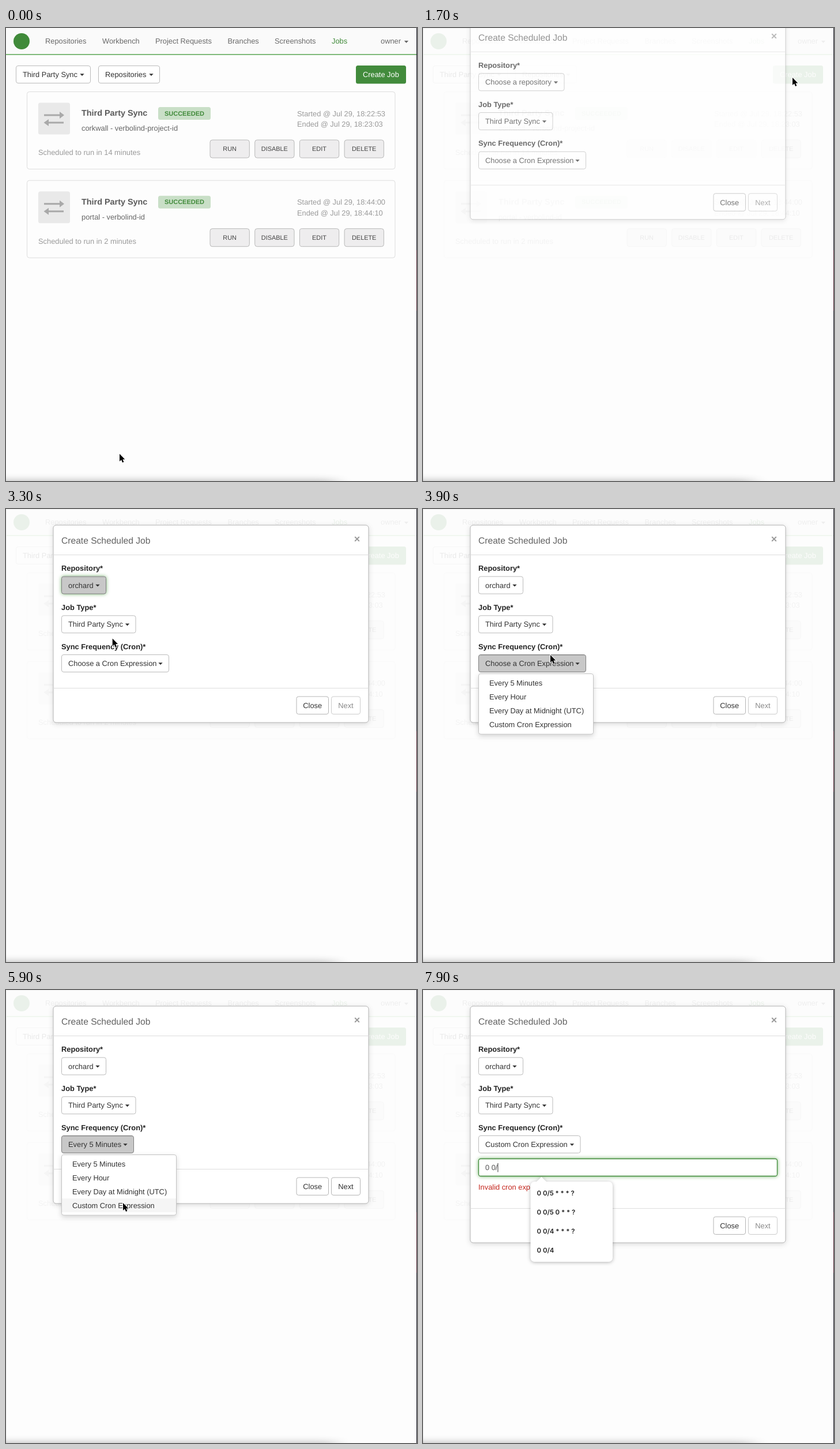
Write an HTML page that moves like this. It is 713 px wide and 785 px high and loops after 8 s.

```html
<!DOCTYPE html>
<html lang="en">
<head>
<meta charset="utf-8">
<title>Create Scheduled Job</title>
<style>
  html, body { margin: 0; width: 100%; height: 100%; overflow: hidden; background: #fdfdfd; }
  svg { display: block; width: 100%; height: 100%; }
  text { font: 12.85px "Liberation Sans", Arial, sans-serif; white-space: pre; text-rendering: geometricPrecision; }
  .bold { font-weight: 700; }
  .mid { text-anchor: middle; }
  .hint { font: 600 11.4px Inter, "Open Sans", sans-serif; }
  .menu { filter: drop-shadow(0 3px 4px rgba(0, 0, 0, .16)); }
  .popup { filter: drop-shadow(0 1px 3px rgba(0, 0, 0, .3)); }
  .dialog { filter: drop-shadow(0 2px 4px rgba(0, 0, 0, .14)); }
  .glow { filter: drop-shadow(0 0 3px rgba(80, 160, 70, .75)); }
</style>
</head>
<body>
<svg viewBox="0 0 713 785">
  <defs>
    <filter id="soft" x="-20%" y="-200%" width="140%" height="500%">
      <feGaussianBlur stdDeviation="16 7"/>
    </filter>
  </defs>
  <g id="scene"></g>
  <rect x="-80" y="785" width="652" height="50" opacity=".3" filter="url(#soft)"/>
  <path d="M712.5 0V785" stroke="#20202c"/>
  <path d="M712.5 385V490" stroke="#4a2030"/>
</svg>
<script>
const LOOP = 8000, STEP = 100;
const GREEN = '#408a3a';
const scene = document.getElementById('scene');

const PRESS_CREATE = 800, BACKDROP = 1450, DIALOG = 1600;
const OPEN_REPO = 2300, PICK_REPO = 3000;
const OPEN_CRON = 3700, PICK_PRESET = 4700, REOPEN_CRON = 5400, PICK_CUSTOM = 6200;
const FOCUS_INPUT = 6400, SHOW_HINTS = 6500, TYPE_START = 6900, TYPE_GAP = 300;

const REPOS = ['corkwall', 'portal', 'orchard'];
const SCHEDULES = ['Every 5 Minutes', 'Every Hour', 'Every Day at Midnight (UTC)', 'Custom Cron Expression'];
const HISTORY = ['0 0 0 * * ?', '0 0/5 * * * ?', '0 0 * * * ?', '0 0/5 0 * * ?',
  'adsasdf', 'asdf', '0 0/4 * * * ?', '0 0/4'];

// Pointer stops: time, x, y
const POINTER = [
  [0, 197, 738], [600, 641, 86], [1700, 641, 86], [2200, 232, 126], [2600, 232, 126],
  [2900, 165, 209], [3100, 165, 209], [3600, 221, 253], [4000, 221, 253], [4400, 202, 298],
  [4800, 202, 298], [5100, 202, 270], [5400, 202, 270], [5800, 203, 369], [6200, 203, 369],
  [6500, 203, 314]
];

const clamp = v => Math.max(0, Math.min(1, v));
const ease = v => v * v * (3 - 2 * v);
const between = (t, from, to) => t >= from && t < to;

function pointerAt(t) {
  const next = POINTER.findIndex(p => p[0] > t);
  if (next < 0) return POINTER[POINTER.length - 1].slice(1);
  const [t0, x0, y0] = POINTER[next - 1], [t1, x1, y1] = POINTER[next];
  const k = ease((t - t0) / (t1 - t0));
  return [x0 + (x1 - x0) * k, y0 + (y1 - y0) * k];
}

const text = (x, y, str, fill = '#333', cls = '', size = 0) =>
  `<text x="${x}" y="${y}" fill="${fill}" class="${cls}"${size ? ` style="font-size:${size}px"` : ''}>${str}</text>`;
const box = (x, y, w, h, fill, stroke = 'none', r = 3.5, extra = '') =>
  `<rect x="${x}" y="${y}" width="${w}" height="${h}" rx="${r}" fill="${fill}" stroke="${stroke}" ${extra}/>`;
const line = (x1, x2, y, color) => `<path d="M${x1} ${y}H${x2}" stroke="${color}"/>`;
const arrowDown = (x, y, fill = '#333') => `<path d="M${x - 3.7} ${y}h7.4l-3.7 3.9z" fill="${fill}"/>`;

function dropdown(x, y, w, label, fill = '#fff', glow = false) {
  const active = fill === '#c8c8c8';
  return box(x + .5, y + .5, w - 1, 30, fill, active ? '#808080' : '#bbb', 3.5, glow ? 'class="glow"' : '') +
    (active ? `<path d="M${x + 3} ${y + 1.5}H${x + w - 3}" stroke="#b0b0b0"/>` : '') +
    text(x + 12, y + 20, label) + arrowDown(x + w - 15, y + 14.2);
}

function menu(y, w, items, pointerY) {
  const rows = items.map((label, i) => {
    const top = y + 5 + i * 23.8;
    const hover = between(pointerY, top, top + 23.8);
    return (hover ? box(97, top, w - 2, 23.8, '#f5f5f5', 'none', 0) : '') + text(115, top + 16.3, label);
  });
  return box(96.5, y + .5, w - 1, items.length * 23.8 + 9.5, '#fff', '#c4c4c4', 3.5, 'class="menu"') + rows.join('');
}

function card(y, project, wait, started, ended) {
  const actions = ['RUN', 'DISABLE', 'EDIT', 'DELETE'].map((label, i) => {
    const x = 354 + i * 77.7;
    return box(x, 84, 68.3, 31, '#eeedee', '#b8b8b8', 4) + text(x + 34.1, 103.3, label, '#444', 'mid', 10.9);
  });
  return `<g transform="translate(0 ${y})">` +
    box(36.5, .5, 638.5, 134, '#fdfdfd', '#ddd', 4) +
    box(56, 19.5, 55, 55, '#e9e9e9') +
    '<path d="M66 39.5H93V35L101 41L93 47V42.5H66zM100 52.5H74V48L65.500 54L74 60V55.500H100z" fill="#a9a9a9"/>' +
    text(131, 42, 'Third Party Sync', '#5a5a5a', 'bold', 14.4) +
    box(264, 27, 91, 22, '#c9dfc7') + text(309.5, 41.8, 'SUCCEEDED', GREEN, 'bold mid', 11) +
    text(131, 68, project, '#666') +
    text(56, 110.3, `Scheduled to run in ${wait}`, '#9a9a9a') +
    text(505, 42.5, `Started @ Jul 29, ${started}`, '#9a9a9a') +
    text(505, 61, `Ended @ Jul 29, ${ended}`, '#9a9a9a') +
    actions.join('') + '</g>';
}

function createButton(t) {
  const pressed = between(t, PRESS_CREATE, DIALOG), hover = between(t, 600, PRESS_CREATE);
  const shape = pressed
    ? box(608, 66, 85, 30, '#29501f', '#1d55a8', 3.5, 'stroke-width="2" class="glow"')
    : box(607, 65, 87, 31.5, hover ? '#316b2c' : '#428b3c');
  return shape + text(619, 85, 'Create Job', '#fff');
}

function page(t) {
  const tabs = [[68, 'Repositories'], [167, 'Workbench'], [259, 'Project Requests'],
    [384.5, 'Branches'], [466, 'Screenshots'], [565, 'Jobs'], [650, 'owner']];
  return box(0, 0, 713, 785, '#fdfdfd', 'none', 0) +
    box(0, 0, 713, 45.5, '#fafafa', 'none', 0) +
    box(0, 45.2, 712, 1.5, '#58a552', 'none', 0) +
    `<circle cx="27" cy="23" r="14" fill="${GREEN}"/>` +
    tabs.map(([x, label]) => text(x, 27.3, label, label === 'Jobs' ? GREEN : '#696969')).join('') +
    arrowDown(694.5, 22, '#696969') +
    dropdown(17, 65, 130, 'Third Party Sync') + dropdown(160, 65, 107, 'Repositories') +
    createButton(t) +
    card(110, 'corkwall - verbolind-project-id', '14 minutes', '18:22:53', '18:23:03') +
    card(263.7, 'portal - verbolind-id', t < PICK_PRESET ? '2 minutes' : '1 minute', '18:44:00', '18:44:10');
}

function cronInput(typed) {
  const caretX = 108.5 + [...typed].reduce((w, c) => w + (c === '0' ? 7.15 : 3.57), 0);
  return box(96.5, 292.5, 518, 30, '#fff', GREEN, 3.5, 'stroke-width="1.3" class="glow"') +
    text(108, 312, typed || 'Enter Custom Cron Expression (e.g. 0 0/5 * * * ?)', typed ? '#555' : '#8c8c8c') +
    `<path d="M${caretX} 300V315.500" stroke="#333"/>`;
}

function hints(typed) {
  const items = HISTORY.filter(h => h.startsWith(typed)).slice(0, 6);
  return '<g class="popup"><path d="M196 333L205.500 324L215 333z" fill="#fff"/>' +
    box(186.5, 332, 142.5, items.length * 33 + 7, '#fff', 'none', 7) + '</g>' +
    items.map((h, i) => text(197.5, 356.3 + i * 33, h, '#222', 'hint')).join('');
}

function footer(y, enabled) {
  return line(82, 629, y, '#ddd') +
    box(504, y + 14.5, 55.5, 30.5, '#fff', '#b5b5b5') + text(531.7, y + 34.5, 'Close', '#333', 'mid') +
    box(564.5, y + 14.5, 50, 30.5, '#fff', enabled ? '#b5b5b5' : '#ccc') +
    text(589.5, y + 34.5, 'Next', enabled ? '#333' : '#8a8a8a', 'mid');
}

function dialog(t, pointerY) {
  const custom = t >= PICK_CUSTOM;
  const typed = t < TYPE_START ? '' : '0 0/'.slice(0, 1 + Math.floor((t - TYPE_START) / TYPE_GAP));
  const footerY = typed ? 378.5 : custom ? 350.5 : 310.5;
  const repoOpen = between(t, OPEN_REPO, PICK_REPO);
  const cronOpen = between(t, OPEN_CRON, PICK_PRESET) || between(t, REOPEN_CRON, PICK_CUSTOM);
  const repoFill = between(t, OPEN_REPO, 3600) ? '#c8c8c8' : between(t, 2200, OPEN_REPO) ? '#e2e2e2' : '#fff';
  const cronFill = between(t, OPEN_CRON, FOCUS_INPUT) ? '#c8c8c8' : between(t, 3600, OPEN_CRON) ? '#e2e2e2' : '#fff';
  const [cron, cronWidth] = custom ? [SCHEDULES[3], 177.5]
    : t >= PICK_PRESET ? [SCHEDULES[0], 126] : ['Choose a Cron Expression', 187];
  const [repo, repoWidth] = t >= PICK_REPO ? [REPOS[2], 78] : ['Choose a repository', 149.5];

  const shown = clamp((t - DIALOG) / 150);
  const slide = -86 * (1 - clamp((t - DIALOG) / 300)) ** 2;
  return `<g opacity="${shown}" transform="translate(0 ${slide})">` +
    box(82, 28, 547, footerY + 31.5, '#fff', '#b4b4b4', 5, 'class="dialog"') +
    text(96, 60, 'Create Scheduled Job', '#626262', '', 15.6) +
    text(609, 58, '×', '#999', 'bold mid', 18) +
    line(82, 629, 79.5, '#ddd') +
    text(96, 107.3, 'Repository*', '#222', 'bold') +
    text(96, 175, 'Job Type*', '#222', 'bold') +
    text(96, 242.5, 'Sync Frequency (Cron)*', '#222', 'bold') +
    dropdown(96, 116.5, repoWidth, repo, repoFill, between(t, PICK_REPO, 3600)) +
    dropdown(96, 184.3, 129.5, 'Third Party Sync') +
    dropdown(96, 252, cronWidth, cron, cronFill, cronFill === '#c8c8c8' && !cronOpen) +
    (custom ? cronInput(typed) : '') +
    (typed ? text(96, 346, 'Invalid cron expression', '#c4261d') : '') +
    footer(footerY, t >= PICK_PRESET && !typed) +
    (repoOpen ? menu(150, 146, REPOS, pointerY) : '') +
    (cronOpen ? menu(285, 200, SCHEDULES, pointerY) : '') +
    (t >= SHOW_HINTS ? hints(typed) : '') + '</g>';
}

function draw(t) {
  const [x, y] = pointerAt(t);
  let out = page(t);
  if (t > BACKDROP) {
    const veil = .9 * clamp((t - BACKDROP) / 150);
    out += box(0, 0, 713, 785, '#fdfdfd', 'none', 0, `opacity="${veil}"`) +
      '<path d="M.5 785V.5H712" fill="none" stroke="#efefef"/>';
  }
  if (t > DIALOG) out += dialog(t, y + 3);
  if (t < TYPE_START) {
    out += `<path transform="translate(${x} ${y})" d="M0 0V13L3 10.300L5 15L7.400 14L5.400 9.400H9.300z"
      fill="#000" stroke="#fff" stroke-width="1.6" paint-order="stroke"/>`;
  }
  scene.innerHTML = out;
}

const start = performance.now();
let lastTick = -1;
function loop() {
  const tick = Math.floor((performance.now() - start) % LOOP / STEP);
  if (tick !== lastTick) draw((lastTick = tick) * STEP);
  requestAnimationFrame(loop);
}
loop();
</script>
</body>
</html>
```
